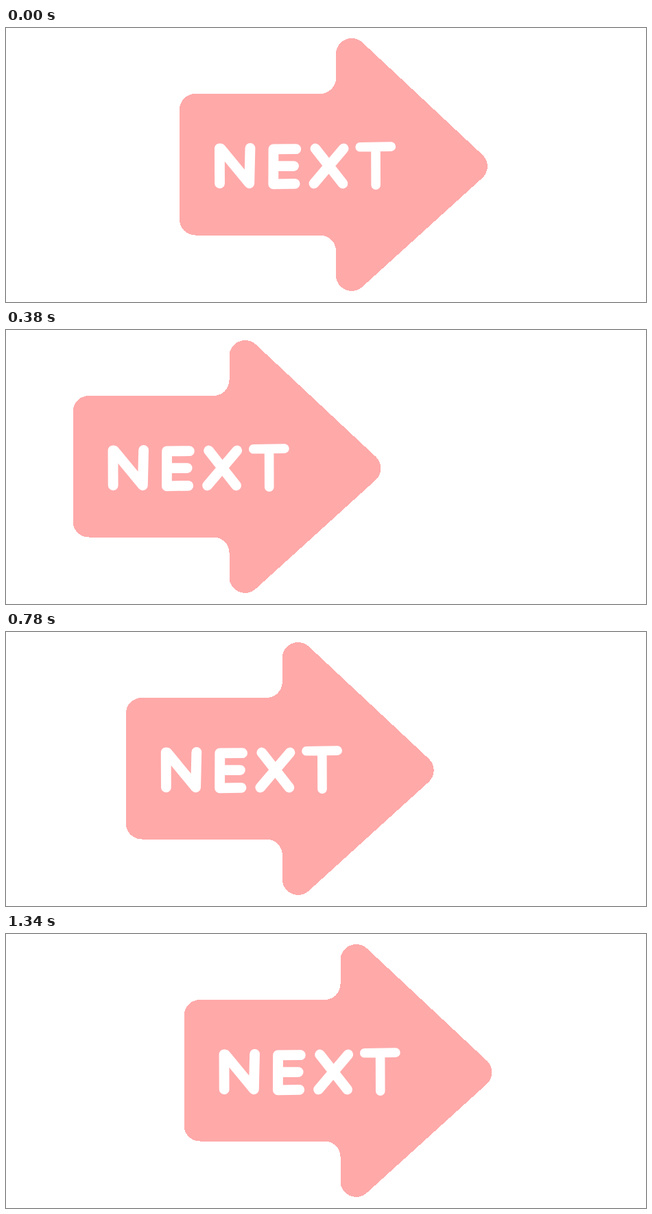
Recreate the animation shown at these times as an HTML page. Size 933 by 400 pixels, loop 1360 ms.

```html
<!DOCTYPE html>
<html lang="en">
<head>
<meta charset="utf-8">
<title>Next arrow</title>
<style>
  html, body { margin: 0; width: 100%; height: 100%; overflow: hidden; background: #fff; }
  svg { display: block; width: 933px; height: 400px; }
  .lettering { fill: none; stroke: #fff; stroke-width: 14.8; stroke-linecap: round; stroke-linejoin: round; }
</style>
</head>
<body>
<svg viewBox="0 0 933 400" role="img" aria-label="NEXT">
  <g id="arrow">
    <path fill="#ffa9a9" shape-rendering="crispEdges" d="M0 119A23 23 0 0 1 23 96H205A23 23 0 0 0 228 73V38
      A23 23 0 0 1 266.8 21.3L441.8 185.3A23 23 0 0 1 441.6 218.8L266.6 377.8A23 23 0 0 1 228 361
      V325.5A23 23 0 0 0 205 302.5H23A23 23 0 0 1 0 279.5Z"/>
    <g class="lettering">
      <path d="M58.6 226.8L58.4 175.8L60 176L101.8 226.8L103 175.4"/>
      <path d="M169.8 176.7L137 176.8L136.8 227.8L168.2 227.3M138 201.6H166.6"/>
      <path d="M198 176L238 227M239.2 176L196 227"/>
      <path stroke-width="13.6" d="M263.2 173.8L308.4 173.1M286 174L286.2 229.2"/>
    </g>
  </g>
</svg>
<script>
const LOOP = 1360, STEP = 20;
const LEFT = 93, RIGHT = 285;
const SWING = 688.5;       // duration of one sweep
const LOWEST = 484;        // moment of the leftmost pose
const SKIP = 17;           // jump after the opening hold
const X1 = 0.48, X2 = 0.5; // cubic-bezier(X1, 0, X2, 1)
const arrow = document.getElementById('arrow');

function ease(x) {
  let low = 0, high = 1;
  for (let i = 0; i < 24; i++) {
    const s = (low + high) / 2, r = 1 - s;
    if (3 * X1 * s * r * r + 3 * X2 * s * s * r + s ** 3 < x) low = s;
    else high = s;
  }
  return low * low * (3 - 2 * low);
}

function leftAt(time) {
  const clock = time < 2 * STEP ? 0 : time + SKIP;
  const phase = (clock - LOWEST + 2 * SWING) % (2 * SWING) / SWING;
  const rise = phase < 1 ? ease(phase) : 1 - ease(phase - 1);
  return LEFT + (RIGHT - LEFT) * rise;
}

const start = performance.now();
function draw() {
  const time = (performance.now() - start) % LOOP;
  const x = leftAt(Math.floor(time / STEP) * STEP);
  arrow.setAttribute('transform', `translate(${x.toFixed(2)} 0)`);
  requestAnimationFrame(draw);
}
draw();
</script>
</body>
</html>
```
